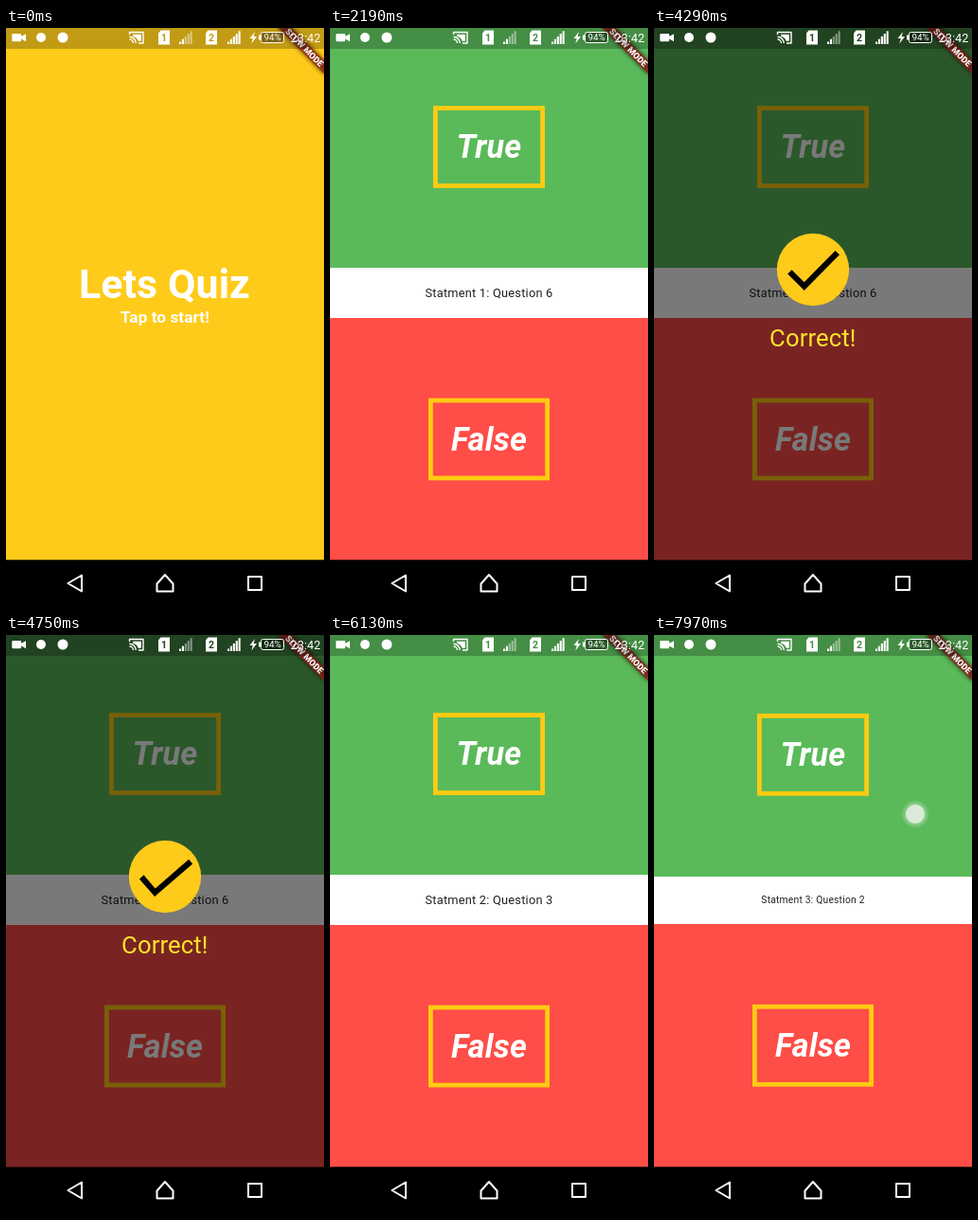
Write an HTML page that moves like this. It is 336x611 px and loops after 8 s.

```html
<!DOCTYPE html>
<html lang="en">
<head>
<meta charset="utf-8">
<title>Lets Quiz</title>
<style>
html, body { margin: 0; width: 100%; height: 100%; overflow: hidden; background: #000; }
svg { display: block; width: 336px; height: 611px; font-family: Roboto, sans-serif; }
text { text-anchor: middle; }
.answer { font: italic 700 34.2px Roboto, sans-serif; letter-spacing: .2px; fill: #fff; }
.frame { fill: none; stroke: #ffcb12; stroke-width: 4.8; }
.line { fill: none; stroke: #fff; stroke-width: 2; stroke-linejoin: round; }
.title { font-weight: 700; fill: #fff; letter-spacing: .1px; }
</style>
</head>
<body>
<svg viewBox="0 0 336 611">
  <defs>
    <filter id="blur" x="-50%" y="-150%" width="200%" height="400%"><feGaussianBlur stdDeviation="2.6"/></filter>
    <radialGradient id="halo">
      <stop offset=".6" stop-color="#fff" stop-opacity=".4"/>
      <stop offset="1" stop-color="#fff" stop-opacity="0"/>
    </radialGradient>
  </defs>

  <g id="splash">
    <rect width="336" height="561.5" fill="#ffcb1a"/>
    <text class="title" x="167.5" y="284.6" font-size="42.8">Lets Quiz</text>
    <text class="title" x="168" y="311" font-size="17.1">Tap to start!</text>
  </g>

  <g id="quiz">
    <rect width="336" height="300" fill="#5aba5a"/>
    <rect y="290" width="336" height="271.5" fill="#ff4d47"/>
    <rect id="strip" width="336" fill="#fff"/>
    <text id="question" x="168" letter-spacing=".21" fill="#212121"></text>
    <g id="yes">
      <rect class="frame" x="111.4" y="-41" width="113.2" height="82"/>
      <text class="answer" x="168" y="11.8">True</text>
    </g>
    <g id="no">
      <rect class="frame" x="106.4" y="-41" width="123.2" height="82"/>
      <text class="answer" x="168" y="11.8">False</text>
    </g>
  </g>

  <g id="overlay">
    <rect width="336" height="561.5" fill="#000" fill-opacity=".525"/>
    <circle cx="168" cy="255" r="38.2" fill="#ffcb1a"/>
    <g id="tick"><path transform="scale(3.12) translate(-12 -12)" d="M9 16.2 4.8 12l-1.4 1.4L9 19 21 7l-1.4-1.4z"/></g>
    <text x="167.8" y="336" font-size="25.7" letter-spacing=".1" fill="#ffe22b">Correct!</text>
  </g>

  <g transform="translate(336) rotate(45)">
    <rect x="-34.2" y="24" width="68.5" height="10.3" fill="#000" fill-opacity=".65" filter="url(#blur)"/>
    <rect x="-34.2" y="24" width="68.5" height="10.3" fill="#a01c18" fill-opacity=".65"/>
    <text y="32.4" font-size="9.2" font-weight="900" fill="#fff">SLOW MODE</text>
  </g>

  <rect width="336" height="22" fill="#000" fill-opacity=".24"/>
  <g id="status" fill="#fff">
    <path d="M7.5 6h7.5q1.2 0 1.2 1.2v1.6L21 6.2v8l-4.8-2.6v1.5q0 1.2-1.2 1.2H7.5q-1.2 0-1.2-1.2v-6Q6.3 6 7.5 6z"/>
    <circle cx="37" cy="10" r="5"/>
    <circle cx="60" cy="10" r="5.5"/>
    <path class="line" style="stroke-width:1.4" d="M130.5 7V4.5h14.5v11.5h-5M130.5 9.2a7 7 0 0 1 6.8 6.8M130.5 12a4 4 0 0 1 4 4"/>
    <path d="M134 6.8h8.8v7h-3.2q-1-4-5.6-5z"/>
    <g id="sims"></g>
    <g id="bars"></g>
    <path d="M263 4l-5.5 7h3.3l-1.5 5.5 5.7-7.5h-3.4z"/>
    <rect x="269.5" y="4.5" width="24" height="11" rx="2" fill="#000" fill-opacity=".35" stroke="#fff"/>
    <rect x="267" y="7.5" width="2" height="5"/>
    <text x="281.5" y="13.4" font-size="9.8">94%</text>
    <text x="316.5" y="14.6" font-size="12.8">23:42</text>
  </g>

  <rect y="561.5" width="336" height="50"/>
  <path class="line" d="M65.5 586 80 577.5v17zM159.5 586.5l8.5-9.5 8.5 9.5v8h-17zM256 579h14v14h-14z"/>

  <g id="touch">
    <circle id="glow" r="15" fill="url(#halo)"/>
    <circle r="10" fill="#e4efe2" fill-opacity=".85"/>
  </g>
</svg>
<script>
const $ = id => document.getElementById(id);
const LOOP = 8000, QUIZ_START = 1250;

const questions = [
  { start: 1115, label: "Statment 1: Question 6" },
  { start: 5021, label: "Statment 2: Question 3" },
  { start: 7808, label: "Statment 3: Question 2" }
];
const answers = [{ start: 3690, end: 5021 }, { start: 6930, end: 7808 }];
const touches = [
  { x: 254, y: 153, down: 3120, up: 3270 },
  { x: 273, y: 195, down: 6900, up: 7200 },
  { x: 276, y: 189, down: 7700, up: 8000 }
];

$("sims").innerHTML = [161, 211].map((x, i) =>
  `<path d="M${x + 2.5} 2.5h9.5v15h-12v-12z"/>
   <text x="${x + 6}" y="14" font-size="10.5" font-weight="700" fill="currentColor">${i + 1}</text>`).join("");

const signal = (x, lit) => Array.from({ length: 5 }, (_, i) => {
  const h = 2.5 + i * 2.8;
  return `<rect x="${x + i * 2.9}" y="${17 - h}" width="2.1" height="${h}" fill-opacity="${i < lit ? 1 : .45}"/>`;
}).join("");
$("bars").innerHTML = signal(183, 2) + signal(234, 5);

function bounceOut(t) {
  if (t >= 1) return 1;
  const k = 7.5625, d = 2.75;
  if (t < 1 / d) return k * t * t;
  if (t < 2 / d) return k * (t - 1.5 / d) ** 2 + .75;
  if (t < 2.5 / d) return k * (t - 2.25 / d) ** 2 + .9375;
  return k * (t - 2.625 / d) ** 2 + .984375;
}

const elasticOut = t => t <= 0 ? 0 : 1 + 2 ** (-10 * t) * Math.sin((t - .1) * 2 * Math.PI / .4);
const show = (id, on) => $(id).style.display = on ? "" : "none";
const moveY = (id, y) => $(id).setAttribute("transform", `translate(0 ${y})`);

function drawQuestion(now) {
  const q = questions.filter(q => q.start <= now).pop();
  if (!q) return;
  const grow = bounceOut((now - q.start) / 500);
  const half = (37.5 + 15.3 * grow) / 2, middle = 279.7, size = 12.83 * grow;
  const top = Math.round(middle - half), bottom = Math.round(middle + half);
  $("strip").setAttribute("y", top);
  $("strip").setAttribute("height", bottom - top);
  $("question").textContent = q.label;
  $("question").style.fontSize = size + "px";
  $("question").setAttribute("y", middle + size * .3415);
  moveY("yes", (middle - half) / 2 - 1.1);
  moveY("no", (middle + half + 561.5) / 2 + .2);
}

function drawTouch(now) {
  const p = touches.find(p => now >= p.down && now < p.up + 200);
  show("touch", p);
  if (!p) return;
  const fade = Math.min(1, 1 - (now - p.up) / 200);
  $("touch").setAttribute("transform", `translate(${p.x} ${p.y})`);
  $("touch").setAttribute("opacity", fade);
  show("glow", fade === 1);
}

function draw(now) {
  const inQuiz = now >= QUIZ_START;
  const answer = answers.find(a => now >= a.start && now < a.end);
  show("splash", !inQuiz);
  show("quiz", inQuiz);
  show("overlay", answer);
  $("status").style.color = answer ? "#204320" : inQuiz ? "#448d44" : "#c29a14";
  if (inQuiz) drawQuestion(now);
  if (answer) {
    const turn = elasticOut((now - answer.start) / 2000) * 360;
    $("tick").setAttribute("transform", `translate(168 255) rotate(${turn})`);
  }
  drawTouch(now);
}

const begin = performance.now();
function tick() {
  draw((performance.now() - begin) % LOOP);
  requestAnimationFrame(tick);
}
tick();
</script>
</body>
</html>
```
